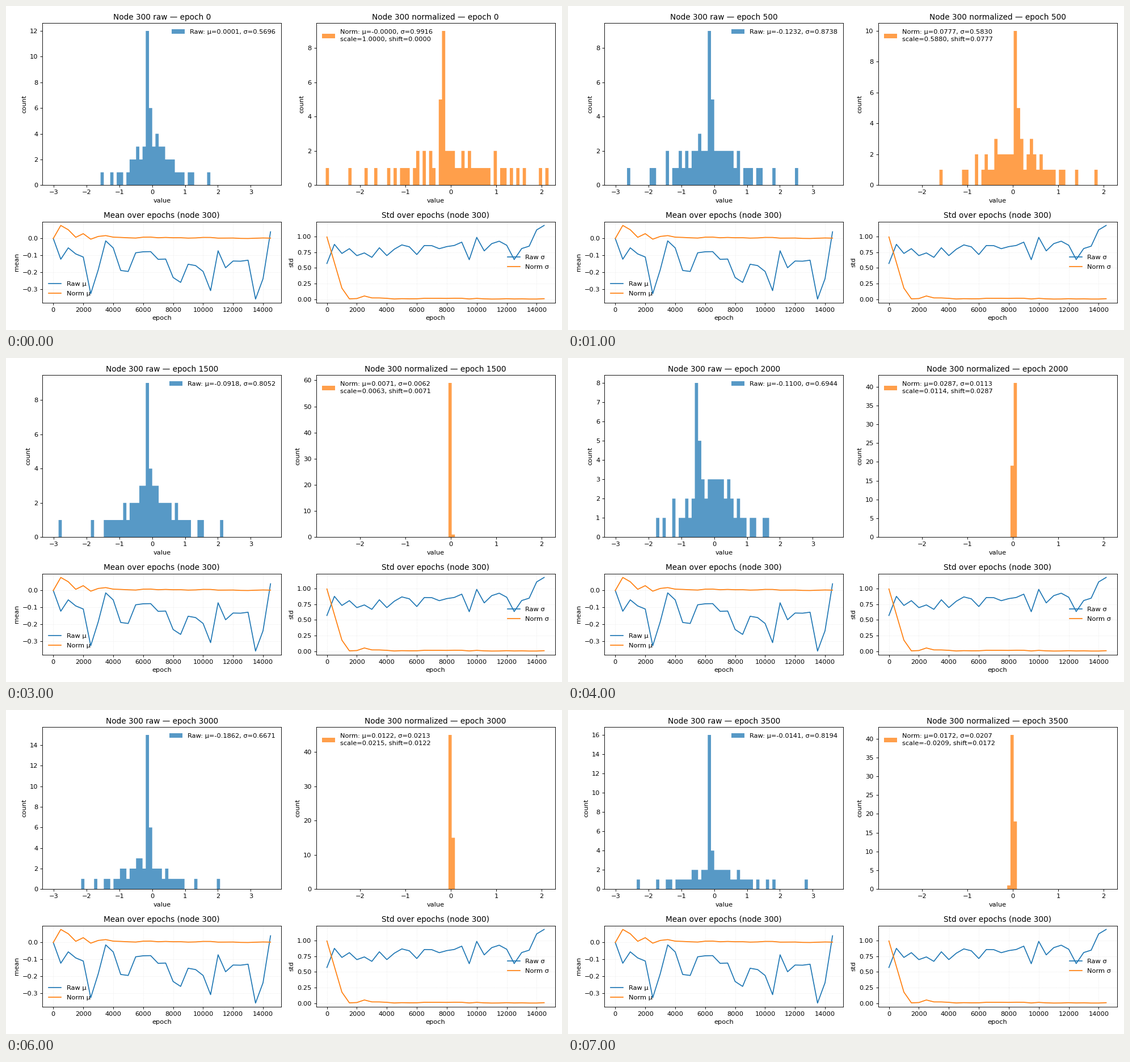
Write a matplotlib script that moves like this. It is 980 by 572 pixels and loops after 8000 ms.

```python
import numpy as np
import matplotlib.pyplot as plt
from matplotlib.animation import FuncAnimation

W, H = 980, 572
DPI = W / 12
BLUE, ORANGE = "C0", "C1"
BATCH = 60
RAW_EDGES = np.linspace(-3.337, 3.931, 75)
NORM_EDGES = np.linspace(-2.963, 2.295, 75)

epochs = np.arange(30) * 500
LATER = 22
rng = np.random.default_rng(300)

# Each shown epoch: raw mean, raw std, scale, shift, tallest raw bin, where it stands
STEPS = [
    (0.0001, 0.5696, 1.0, -0.00001, 12, -0.108),
    (-0.1232, 0.8738, 0.58796, 0.0777, 9, -0.108),
    (-0.0555, 0.7293, 0.178245, 0.0521, 12, -0.183),
    (-0.0918, 0.8052, 0.0063, 0.0071, 9, -0.108),
    (-0.1100, 0.6944, 0.0114, 0.0287, 8, -0.57),
    (-0.3283, 0.7371, 0.0524, -0.0040, 15, -0.108),
    (-0.1862, 0.6671, 0.0215, 0.0122, 15, -0.108),
    (-0.0141, 0.8194, -0.0209, 0.0172, 16, -0.108),
]
mean, std, scale, shift = np.array(STEPS).T[:4]

# Key points of the raw curves after the shown epochs
raw_mean = np.r_[mean, -0.056, -0.19, -0.196, -0.085, -0.079, -0.078, -0.124, -0.122,
                 -0.232, -0.261, -0.153, -0.161, -0.196, -0.31, -0.073, -0.174,
                 -0.134, -0.135, -0.129, -0.36, -0.239, 0.04]
raw_std = np.r_[std, 0.695, 0.797, 0.865, 0.835, 0.712, 0.855, 0.853, 0.805,
                0.838, 0.856, 0.909, 0.63, 0.985, 0.77, 0.885, 0.924,
                0.86, 0.632, 0.807, 0.845, 1.104, 1.175]

# The normalized curves settle near zero with a little jitter.
norm_mean = np.r_[shift, rng.uniform(0, 0.012, LATER) * np.linspace(1, 0.3, LATER)]
norm_std = np.r_[np.abs(scale) * np.sqrt(1 - 1 / BATCH), rng.uniform(0.003, 0.016, LATER)]


def raw_batch(i):
    """A spike of equal values plus a bell, with the epoch's mean and std."""
    mu, sigma, _, _, top, peak = STEPS[i]
    n = BATCH - top
    u = (np.arange(n) + np.random.default_rng(i).uniform(0.1, 0.9, n)) / n
    bell = np.log(u / (1 - u))
    center = (BATCH * mu - top * peak) / n
    spread = np.sqrt((BATCH * (sigma**2 + mu**2) - top * peak**2) / n - center**2)
    bell = center + spread * (bell - bell.mean()) / bell.std()
    # Keep the bell out of the spike's bin so the spike has its full height.
    shared = np.digitize(bell, RAW_EDGES) == np.digitize(peak, RAW_EDGES)
    bell[shared] += RAW_EDGES[1] - RAW_EDGES[0]
    return np.r_[bell, np.linspace(peak - 0.005, peak + 0.005, top)]


# The tiny surplus keeps the canvas from being truncated by one pixel.
fig = plt.figure(figsize=((W + 0.001) / DPI, (H + 0.001) / DPI), dpi=DPI)


def panel(left, top, height, width=421.2):
    return fig.add_axes([left / W, 1 - (top + height) / H, width / W, height / H])


LEFT, RIGHT = 64.2, 546.5
raw_ax, norm_ax = panel(LEFT, 30.4, 285.9), panel(RIGHT, 30.4, 285.9)
mean_ax, std_ax = panel(LEFT, 380.9, 142.95), panel(RIGHT, 380.9, 142.95)


def add_legend(ax, loc):
    legend = ax.legend(loc=loc, frameon=False, labelspacing=0.62, borderaxespad=0.53)
    for text in legend.get_texts():
        text.set_linespacing(1.4)


def history(ax, raw, norm, title, symbol, loc):
    ax.plot(epochs, raw, color=BLUE, label=f"Raw {symbol}")
    ax.plot(epochs, norm, color=ORANGE, label=f"Norm {symbol}")
    ax.set(title=f"{title} over epochs (node 300)", xlabel="epoch", ylabel=title.lower())
    ax.grid(alpha=0.3, linestyle=":")
    add_legend(ax, loc)


def histogram(ax, values, edges, color, title, label, loc):
    ax.clear()
    counts, _ = np.histogram(values, edges)
    bars = ax.stairs(counts, edges, fill=True, color=color, alpha=0.75, label=label)
    bars.set_snap(False)
    ax.set(xlim=(edges[0], edges[-1]), ylim=(0, counts.max() * 1.05),
           title=title, xlabel="value", ylabel="count")
    add_legend(ax, loc)


def draw(i):
    raw = raw_batch(i)
    norm = shift[i] + scale[i] * (raw - mean[i]) / std[i]
    shown_shift = round(shift[i], 4) + 0.0  # avoids "-0.0000"
    histogram(raw_ax, raw, RAW_EDGES, BLUE, f"Node 300 raw — epoch {epochs[i]}",
              f"Raw: μ={mean[i]:.4f}, σ={std[i]:.4f}", "upper right")
    histogram(norm_ax, norm, NORM_EDGES, ORANGE,
              f"Node 300 normalized — epoch {epochs[i]}",
              f"Norm: μ={norm_mean[i]:.4f}, σ={norm_std[i]:.4f}\n"
              f"scale={scale[i]:.4f}, shift={shown_shift:.4f}", "upper left")
    return []


history(mean_ax, raw_mean, norm_mean, "Mean", "μ", "lower left")
history(std_ax, raw_std, norm_std, "Std", "σ", "center right")

anim = FuncAnimation(fig, draw, frames=len(STEPS), interval=1000, repeat=True)
plt.show()
```
